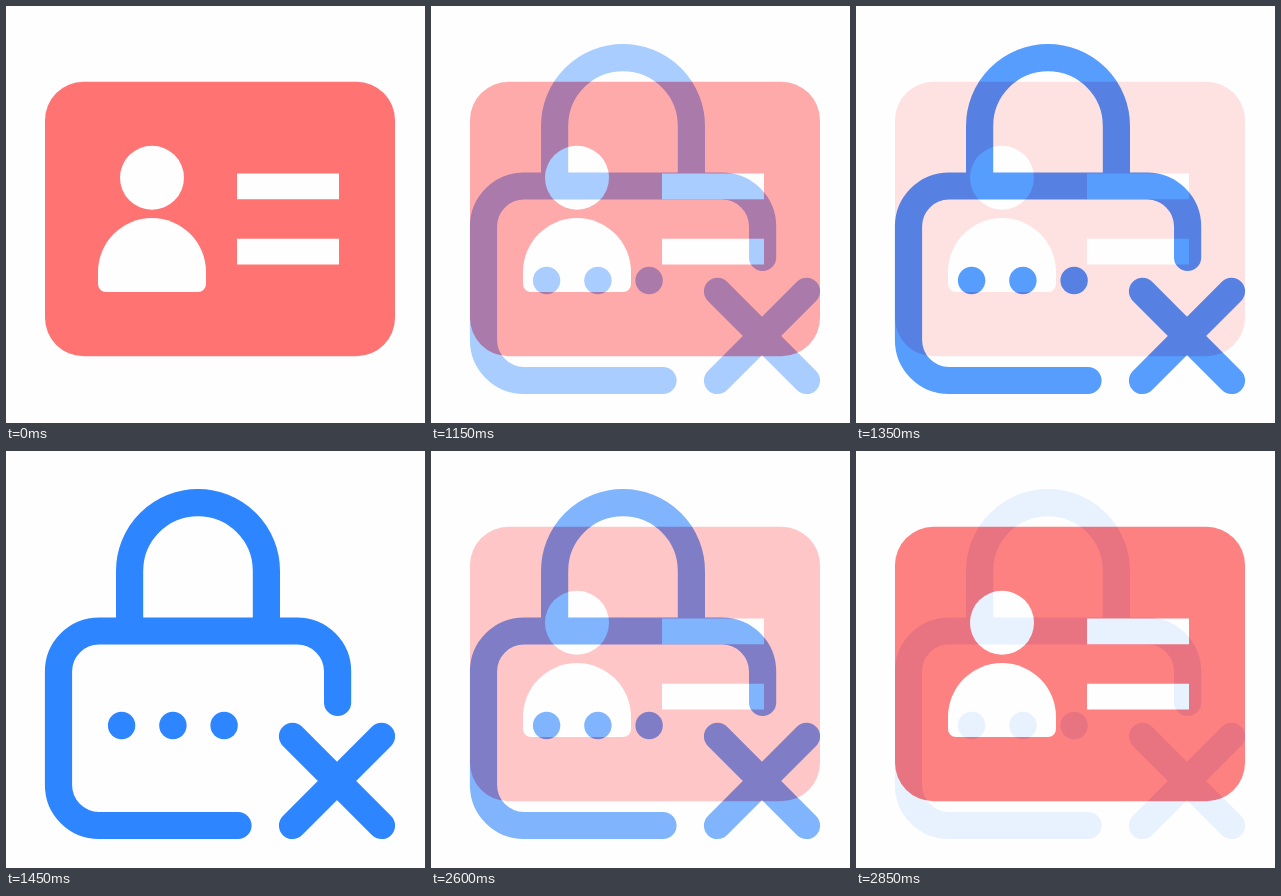
These frames come from a looping animation (419 by 417 pixels, 2900 ms). An HTML page:

```html
<!DOCTYPE html>
<html lang="en">
<head>
<meta charset="utf-8">
<title>Card and lock</title>
<style>
  html, body { margin: 0; width: 100%; height: 100%; overflow: hidden; background: #fefefe; }
  svg { display: block; width: 100%; height: 100%; }
</style>
</head>
<body>
<svg viewBox="0 0 419 417">
  <g id="card" fill="#fefefe">
    <rect x="39" y="75.7" width="350" height="274.6" rx="38.5" fill="#ff7373"/>
    <circle cx="146" cy="171.7" r="32"/>
    <path d="M92 266a54 54 0 0 1 108 0v12a8 8 0 0 1-8 8h-92a8 8 0 0 1-8-8z"/>
    <path d="M231 167.5h102v25.7h-102zM231 232.8h102v25.7h-102z"/>
  </g>
  <g id="lock">
    <rect width="419" height="417" fill="#fefefe"/>
    <g fill="none" stroke="#2d85ff" stroke-width="27.2">
      <path d="M123.6 180V120a68.4 68.4 0 0 1 136.8 0V180"/>
      <g stroke-linecap="round">
        <path d="M331.6 251.5V220.5A40.5 40.5 0 0 0 291.1 180H93A40.5 40.5 0 0 0 52.5 220.5V334A40.5 40.5 0 0 0 93 374.5H232"/>
        <path d="M286.5 285.3L375.5 374.5M375.5 285.3L286.5 374.5"/>
      </g>
    </g>
    <g fill="#2d85ff">
      <circle cx="115.6" cy="274.5" r="13.7"/>
      <circle cx="166.9" cy="274.5" r="13.7"/>
      <circle cx="218.1" cy="274.5" r="13.7"/>
    </g>
  </g>
</svg>
<script>
  const LOOP = 2900, HOLD = 1000, STEP = 50, STEPS = 10;
  const HALF = HOLD + (STEPS - 1) * STEP;

  // Each half holds one picture, then cross-fades in even steps.
  const frames = [];
  for (let half = 0; half < 2; half++) {
    for (let i = 0; i < STEPS; i++) {
      const time = half * HALF + (i ? HOLD + (i - 1) * STEP : 0);
      const mix = i / STEPS;
      frames.push({ offset: time / LOOP, opacity: half ? 1 - mix : mix, easing: 'steps(1, end)' });
    }
  }
  frames.push({ offset: 1, opacity: 0 });

  document.getElementById('lock').animate(frames, { duration: LOOP, iterations: Infinity });
</script>
</body>
</html>
```
